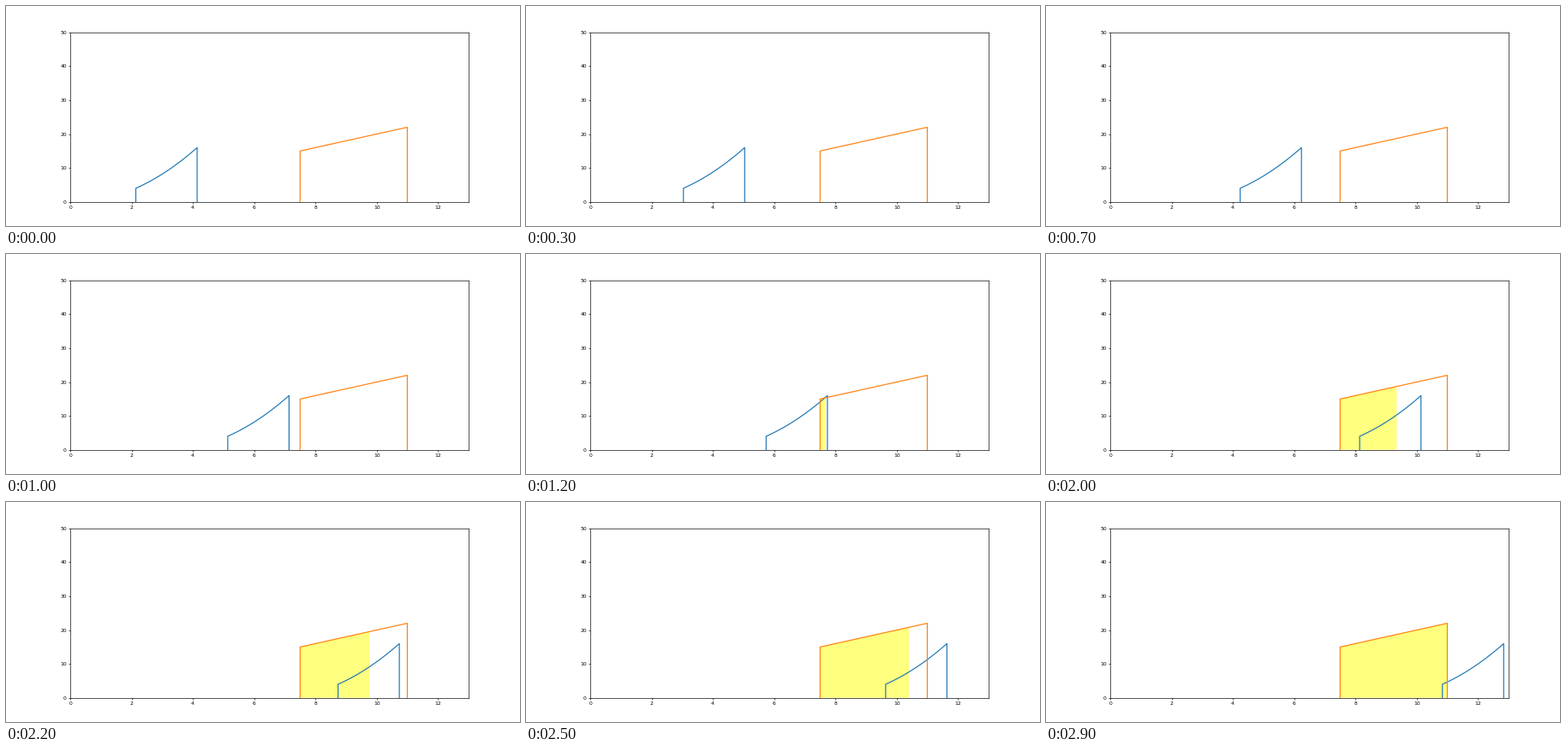
Write a matplotlib script that moves like this. It is 600x257 px and loops after 3000 ms.

```python
import numpy as np
import matplotlib.pyplot as plt
from matplotlib.animation import FuncAnimation

DPI = 600 / 14
FRAMES = 30
START, STEP = 0.14, 0.3      # shift of the moving pulse
LEFT, RIGHT = 7.5, 11        # support of the fixed pulse
FILL_RATE = 0.7              # fill length per unit of overlap

fig, ax = plt.subplots(figsize=(600 / DPI, 257 / DPI), dpi=DPI)
ax.set(xlim=(0, 13), ylim=(0, 50))
ax.tick_params(width=1.1)
for spine in ax.spines.values():
    spine.set_linewidth(1.1)


def outline(x, y):
    """Curve closed by vertical edges down to the axis."""
    return np.r_[x[0], x, x[-1]], np.r_[0, y, 0]


def ramp(x):
    return 2 * x


u = np.linspace(2, 4, 60)
moving, = ax.plot([], [], color="C0", lw=2)
fixed_x = np.array([LEFT, RIGHT])
ax.plot(*outline(fixed_x, ramp(fixed_x)), color="C1", lw=2)
area, = ax.fill([LEFT] * 4, [0] * 4, color="yellow", alpha=0.5, lw=0, zorder=1)


def draw(i):
    shift = START + STEP * i
    moving.set_data(*outline(u + shift, u ** 2))
    overlap = max(0, u[-1] + shift - LEFT)
    end = min(RIGHT, LEFT + FILL_RATE * overlap)
    area.set_xy([(LEFT, 0), (LEFT, ramp(LEFT)), (end, ramp(end)), (end, 0)])
    area.set_visible(overlap > 0)
    return moving, area


anim = FuncAnimation(fig, draw, frames=FRAMES, interval=100, repeat=True,
                     repeat_delay=0)
plt.show()
```
